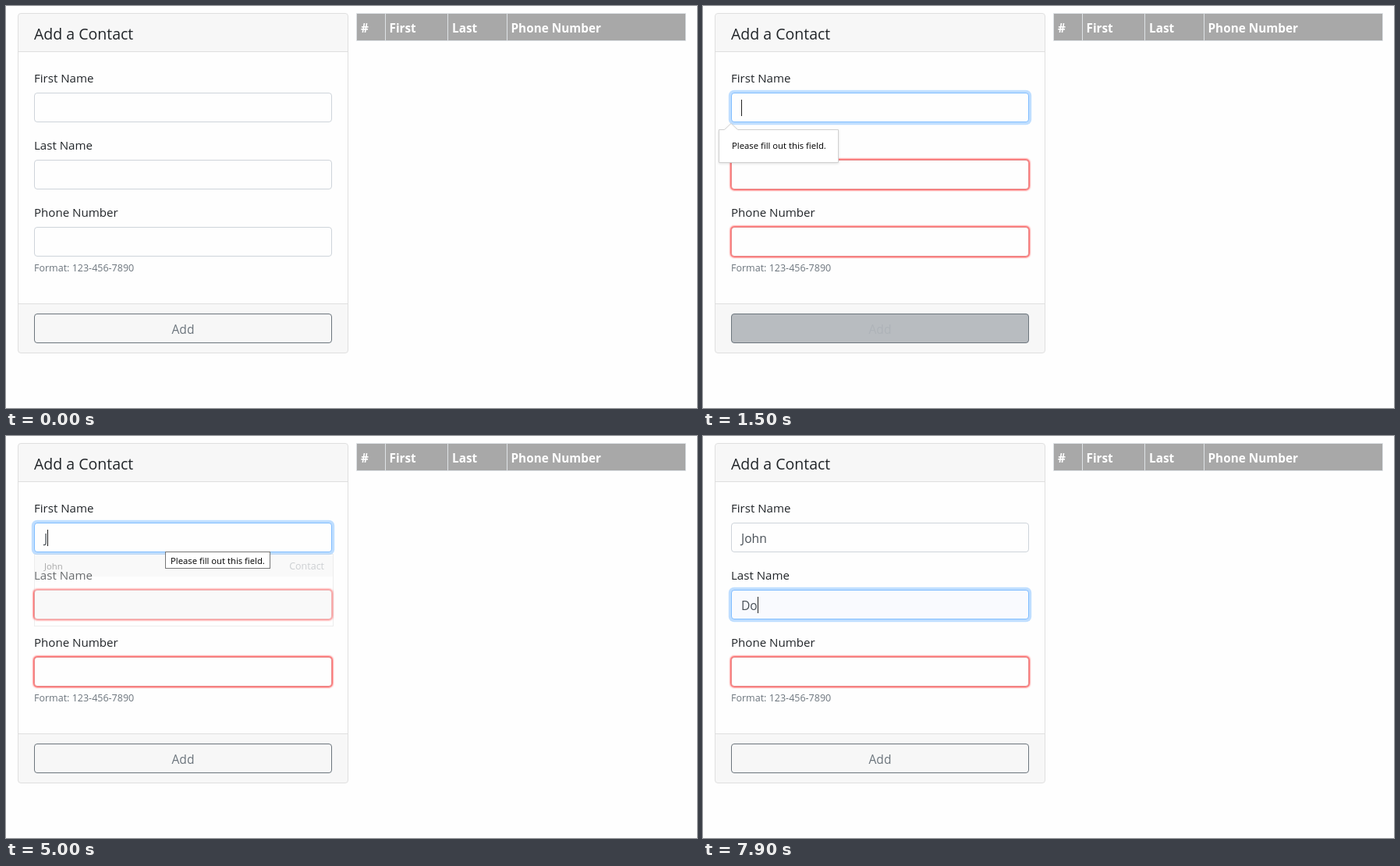
Animation, 886 px wide and 515 px high, one loop 8000 ms. Source, as an HTML page:

```html
<!DOCTYPE html>
<html lang="en">
<head>
<meta charset="utf-8">
<title>Add a Contact</title>
<style>
  html, body { margin: 0; width: 100%; height: 100%; overflow: hidden; background: #fefefe; }
  svg { display: block; width: 886px; height: 515px; font-family: "Open Sans", "Noto Sans", sans-serif; }
  text { fill: #212529; font-size: 15.1px; white-space: pre; }
  .title { font-size: 19.5px; }
  .value { font-size: 15.6px; fill: #495057; }
  .hint { font-size: 12.5px; fill: #6c757d; }
  .tip { font-size: 11.3px; fill: #000; }
  .head { font-size: 15.3px; font-weight: 700; fill: #fff; }
  .line { fill: none; stroke: #dfdfdf; }
  .bar { fill: #f7f7f7; }
  .box { fill: #fefefe; stroke: #ced4da; }
  .ring { fill: #bfdeff; }
  .glow { fill: #f33; filter: url(#soft); }
  .caret { fill: #222; }
  #label { font-size: 15.6px; text-anchor: middle; }
</style>
</head>
<body>
<svg viewBox="0 0 886 515">
  <defs>
    <filter id="soft" x="-5%" y="-20%" width="110%" height="140%"><feGaussianBlur stdDeviation=".8"/></filter>
    <filter id="shade" x="-10%" y="-20%" width="120%" height="150%">
      <feDropShadow dx="0" dy="1" stdDeviation="1.5" flood-opacity=".12"/>
    </filter>
  </defs>

  <path class="bar" d="M16 58V13q0-3 3-3H435q3 0 3 3V58zM16 382H438V441q0 3-3 3H19q-3 0-3-3z"/>
  <path class="line" d="M16 58.5H438M16 381.5H438"/>
  <rect class="line" x="15.5" y="9.5" width="423" height="435" rx="3.5"/>
  <text class="title" x="36" y="43">Add a Contact</text>

  <path fill="#a8a8a8" stroke="#dee2e6" d="M449.5 9.5H871.5V44.5H449.5zM486.5 10V44M566.5 10V44M642.5 10V44"/>
  <text class="head" x="455" y="34">#</text>
  <text class="head" x="491.5" y="34">First</text>
  <text class="head" x="572" y="34">Last</text>
  <text class="head" x="647.5" y="34">Phone Number</text>

  <g id="fields"></g>
  <text class="hint" x="36" y="340">Format: 123-456-7890</text>

  <rect id="button" x="36.5" y="394.5" width="381" height="37" rx="3.5" stroke="#6c757d"/>
  <text id="label" x="227" y="420">Add</text>

  <g id="list">
    <rect x="36.5" y="151.5" width="383" height="92" fill="#fff" stroke="#ccc"/>
    <rect x="37" y="153" width="382" height="27" fill="#f0f0f0"/>
    <text class="tip" x="49" y="171">John</text>
    <text class="hint" x="408" y="171" text-anchor="end">Contact</text>
  </g>

  <g id="popup">
    <path d="M20.5 158.5H27.5L36 150.5L44.5 158.5H173.5V200.5H20.5z" fill="#fff" stroke="#d0d0d0" filter="url(#shade)"/>
    <text class="tip" x="37" y="183">Please fill out this field.</text>
  </g>

  <g id="tooltip">
    <rect x="204.5" y="148.5" width="134" height="21" fill="#fff" stroke="#767676"/>
    <text class="tip" x="211" y="164">Please fill out this field.</text>
  </g>
</svg>
<script>
const $ = id => document.getElementById(id);
const LOOP = 8000, TICK = 100, BLINK = 463;
const SUBMIT = 1260, TAB = 6830;   // moments the focus moves
const GREY = [108, 117, 125], BORDER = [206, 212, 218];

$('fields').innerHTML = ['First Name', 'Last Name', 'Phone Number'].map((name, i) => `
  <g transform="translate(0 ${86 * i})">
    <text x="36" y="98">${name}</text>
    <rect class="ring" x="32.8" y="107.8" width="388.4" height="44.4" rx="7"/>
    <rect class="glow" x="35" y="110" width="384" height="40" rx="5"/>
    <rect class="box" x="36.5" y="111.5" width="381" height="37" rx="3.5"/>
    <text class="value" x="49" y="137"></text>
    <rect class="caret" y="120" width="1" height="21"/>
  </g>`).join('');

const fields = [...$('fields').children].map(g => {
  const part = name => g.querySelector('.' + name);
  return { ring: part('ring'), glow: part('glow'), box: part('box'), value: part('value'), caret: part('caret') };
});

const ramp = (t, from, ms) => Math.min(1, Math.max(0, (t - from) / ms));
const pulse = (t, from, to, inMs, outMs = inMs) => ramp(t, from, inMs) - ramp(t, to, outMs);
const mix = (a, b, k) => `rgb(${a.map((v, i) => Math.round(v + (b[i] - v) * k))})`;

// Text typed so far, and when the caret last restarted its blinking.
function typing(t, word, from, gap, focused) {
  const count = Math.min(word.length, Math.max(0, Math.floor((t - from) / gap) + 1));
  return { text: word.slice(0, count), since: count ? from + (count - 1) * gap : focused };
}

function setField(field, t, focus, bad, typed, active) {
  const { text, since } = typed;
  field.ring.style.opacity = focus;
  field.glow.style.opacity = bad;
  field.box.style.stroke = bad ? '#e89090' : mix(BORDER, [128, 189, 255], focus);
  field.value.textContent = text;
  field.caret.style.opacity = active && Math.floor((t - since) / BLINK) % 2 === 0 ? 1 : 0;
  field.caret.setAttribute('x', Math.round(49 + (text ? field.value.getComputedTextLength() : 0)));
}

function draw(now) {
  const t = Math.floor(now % LOOP / TICK) * TICK;
  const invalid = t > SUBMIT, moved = t > TAB;

  const hover = pulse(t, 550, 700, 250, 200) + pulse(t, 950, 1330, 300, 310);
  $('button').style.fill = mix([247, 247, 247], GREY, hover);
  $('label').style.fill = mix(GREY, [255, 255, 255], hover);

  $('popup').style.opacity = pulse(t, 1250, 2150, 150, 250);
  $('tooltip').style.opacity = pulse(t, 2850, 6550, 50);
  $('list').style.opacity = pulse(t, 4950, 5330, 150, 70);

  const first = typing(t, 'John', 4970, 197, SUBMIT);
  const last = typing(t, 'Do', 7760, 100, TAB);
  setField(fields[0], t, pulse(t, 1200, TAB, 100, 150), 0, first, invalid && !moved);
  setField(fields[1], t, ramp(t, TAB, 150), +(invalid && !moved), last, moved);
  setField(fields[2], t, 0, +invalid, { text: '' }, false);
  fields[1].box.style.fill = t < 1700 ? '#fefefe' : t < 5400 ? '#f7f7f7' : '#f9fafe';
}

const start = performance.now();
function frame() {
  draw(performance.now() - start);
  requestAnimationFrame(frame);
}
frame();
</script>
</body>
</html>
```
